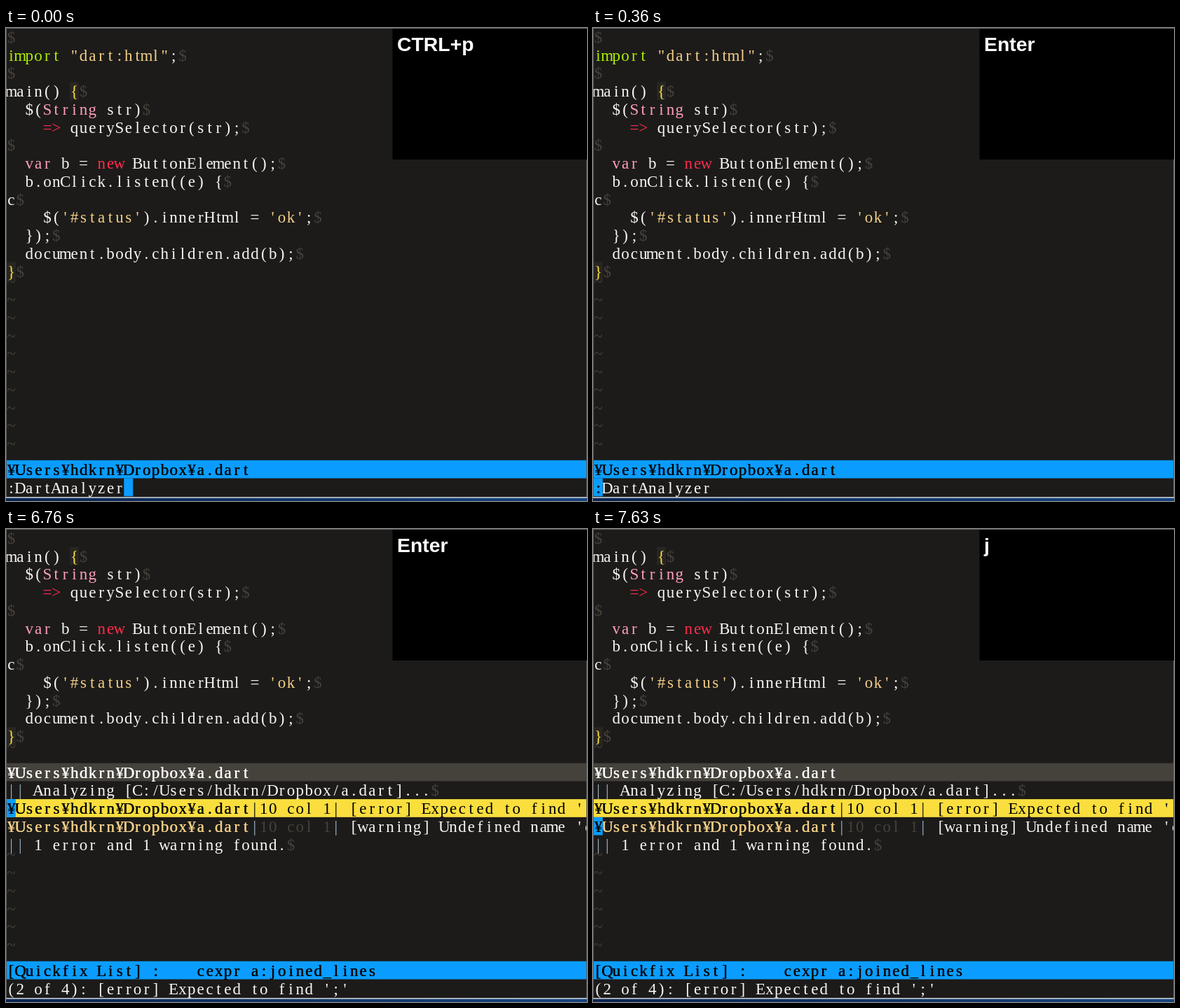
An HTML page with a canvas for the animation above (8000 ms loop, 829 by 676 pixels).

```html
<!DOCTYPE html>
<html lang="en">
<head>
<meta charset="utf-8">
<title>Editor session</title>
<style>
html, body { margin: 0; width: 100%; height: 100%; overflow: hidden; background: #1c1b1a; }
canvas { display: block; }
</style>
</head>
<body>
<canvas id="stage" width="829" height="676"></canvas>
<script>
const ctx = document.getElementById('stage').getContext('2d');
const CW = 12.87, RH = 25.74, LOOP = 8000;
const BLUE = '#0a9dff', YELLOW = '#fade3e', GRAVEL = '#45413b';

// "^x" inside a line switches to colour x; capitals are bold.
const colors = {
  w: '#f8f6f2', g: '#aeee00', s: '#f4cf86', p: '#ff9eb8', r: '#ff2c4b', n: GRAVEL,
  l: '#9db4c4', y: YELLOW, k: '#000', K: '#000', W: '#fff', S: '#f4cf86'
};

const path = '¥Users¥hdkrn¥Dropbox¥a.dart';
const mainCode = [
  'main() ^y{^n$',
  '  $(^pString^w str)^n$',
  '    ^r=>^w querySelector(str);^n$',
  '^n$',
  '  ^pvar^w b = ^rnew^w ButtonElement();^n$',
  '  b.onClick.listen((e) {^n$',
  'c^n$',
  "    $(^s'#status'^w).innerHtml = ^s'ok'^w;^n$",
  '  });^n$',
  '  document.body.children.add(b);^n$',
  '^y}^n$'
];
const tildes = n => Array(n).fill('^n~');

const editing = {
  lines: ['^n$', '^gimport^w ^s"dart:html"^w;^n$', '^n$', ...mainCode, ...tildes(10),
    '^K' + path, ':DartAnalyzer'],
  bars: [[24, BLUE]],
  parens: [[7, 3], [0, 13]]
};
const results = {
  lines: ['^n$', ...mainCode, ...tildes(1),
    '^W' + path,
    '^l||^w Analyzing [C:/Users/hdkrn/Dropbox/a.dart]...^n$',
    `^K${path}^k|10 col 1| [error] Expected to find ';'`,
    `^S${path}^l|^n10 col 1^l|^w [warning] Undefined name 'c'`,
    '^l||^w 1 error and 1 warning found.^n$',
    ...tildes(6),
    '^K[Quickfix List] :    cexpr a:joined_lines',
    "(2 of 4): [error] Expected to find ';'"],
  bars: [[13, GRAVEL], [15, YELLOW], [24, BLUE]],
  parens: [[7, 1], [0, 11]]
};

// start time, screen, pressed key, cursor [column, row, character]
const steps = [
  [0, editing, 'CTRL+p', [13, 25, ' ']],
  [120, editing, 'CTRL+p', null],
  [240, editing, 'CTRL+p', [0, 25, ':']],
  [360, editing, 'Enter', [0, 25, ':']],
  [5860, results, 'Enter', [0, 15, '¥']],
  [6610, results, 'Enter', null],
  [6760, results, 'Enter', [0, 15, '¥']],
  [7260, results, 'Enter', null],
  [7510, results, 'Enter', [0, 16, '¥']],
  [7630, results, 'j', [0, 16, '¥']]
];

function rect(x, y, w, h, color) {
  ctx.fillStyle = color;
  ctx.fillRect(x, y, w, h);
}

const cell = (col, row, color) => rect(1 + col * CW, row * RH, CW, RH, color);

function glyph(ch, col, row, key) {
  const x = 1 + (col + .5) * CW;
  const y = Math.round(row * RH) + (ch === '~' ? 10 : 21);
  ctx.fillStyle = colors[key];
  ctx.fillText(ch, x, y);
  if (key < 'a') ctx.fillText(ch, x + .5, y);
}

function drawLine(line, row) {
  let key = 'w', col = 0;
  for (let i = 0; i < line.length; i++) {
    if (line[i] === '^') key = line[++i];
    else glyph(line[i], col++, row, key);
  }
}

function draw([, screen, label, cursor]) {
  rect(0, 0, 829, 676, '#1c1b1a');
  for (const [row, color] of screen.bars) rect(1, row * RH, 828, RH, color);
  for (const [col, row] of screen.parens) cell(col, row, '#282622');

  ctx.font = '23px "Liberation Serif", "Times New Roman", serif';
  ctx.textAlign = 'center';
  screen.lines.forEach(drawLine);
  if (cursor) {
    const [col, row, ch] = cursor;
    cell(col, row, BLUE);
    glyph(ch, col, row, 'K');
  }

  // window edges
  rect(0, 0, 829, 1, '#5c5c5c');
  rect(0, 0, 1, 670, '#5c5c5c');
  rect(828, 0, 1, 670, '#5c5c5c');
  const desk = ctx.createLinearGradient(0, 0, 829, 0);
  desk.addColorStop(0, '#0a2550');
  desk.addColorStop(1, '#174580');
  rect(0, 671, 829, 5, desk);
  rect(0, 670.3, 829, 1.4, '#e4e8ec');

  // pressed key display
  rect(551.5, 1, 277.5, 187, '#000');
  ctx.font = 'bold 28.4px "Liberation Sans", Arial, sans-serif';
  ctx.textAlign = 'left';
  ctx.fillStyle = '#fff';
  ctx.fillText(label, 558, 33);
}

const start = performance.now();
let shown;
function tick() {
  const t = (performance.now() - start) % LOOP;
  const step = steps.findLast(s => s[0] <= t);
  if (step !== shown) draw(shown = step);
  requestAnimationFrame(tick);
}
tick();
</script>
</body>
</html>
```
